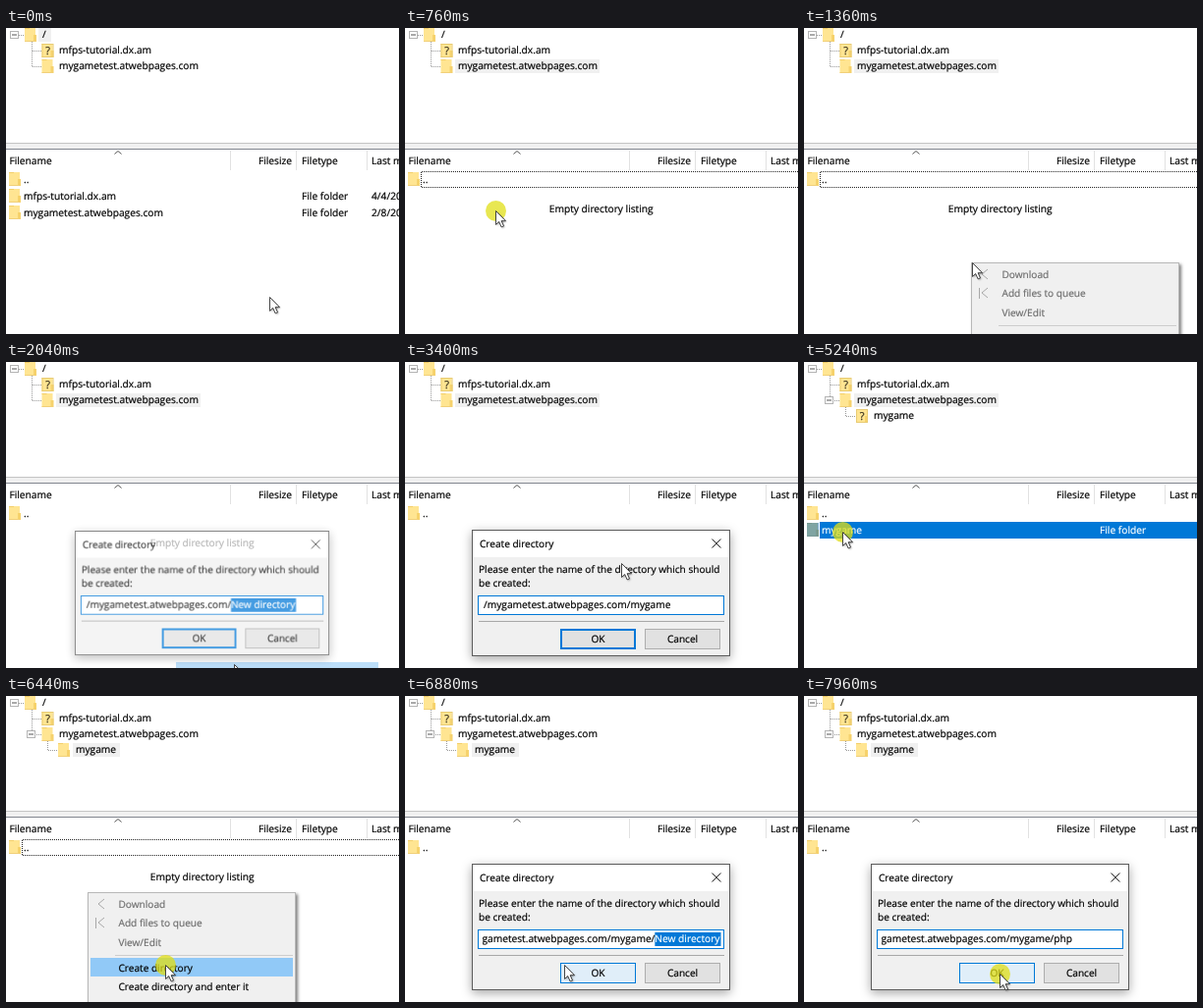
Write an HTML page with a canvas that moves like this. It is 400x312 px and loops after 8 s.

```html
<!DOCTYPE html>
<html lang="en">
<head>
<meta charset="utf-8">
<title>Creating directories</title>
<style>
html, body { margin: 0; width: 100%; height: 100%; overflow: hidden; background: #fff; }
canvas { display: block; }
</style>
</head>
<body>
<canvas id="stage" width="400" height="312"></canvas>
<script>
const stage = document.getElementById('stage').getContext('2d');
// The dialog is drawn on its own layer, so that it fades as a whole
const layer = new OffscreenCanvas(400, 312).getContext('2d');
let ctx = stage;

const LOOP = 8000;
const FONT = '10.2px "Open Sans", "Noto Sans", sans-serif';
const LABEL_FONT = '10.1px "Open Sans", "Noto Sans", sans-serif';
const BLUE = '#0078d7', FACE = '#f0f0f0', INK = '#000';
const HOST = 'mygametest.atwebpages.com';

// Moments at which the state of the file browser changes
const SELECT_HOST = 480, ENTER_HOST = 720, CREATED = 4440, SELECT_CHILD = 5160, ENTER_CHILD = 5600;

// Pointer stops: time, x, y
const POINTER = [
  [0, 268, 274], [80, 268, 274], [460, 92, 186], [900, 92, 186], [1280, 171, 239], [1400, 171, 239],
  [1740, 232, 308], [2200, 232, 308], [2600, 228, 275], [2680, 228, 275], [3000, 220, 205],
  [3500, 220, 205], [3800, 200, 282], [4400, 200, 282], [5000, 39, 173], [5620, 39, 173],
  [5860, 83, 200], [5980, 83, 200], [6320, 162, 274], [6960, 162, 274], [7240, 121, 284], [7680, 199, 283]
];
const CLICKS = [480, 640, 1820, 3840, 5160, 5420, 6380, 7880];
const MENUS = [
  { x: 170, y: 239, from: 1330, to: 1920 },
  { x: 83, y: 200, from: 5900, to: 6540 }
];
const DIALOGS = [
  { path: `/${HOST}/`, word: 'mygame', keys: [2720, 2830, 2940, 3060, 3170, 3280], open: 1960, close: 3940 },
  { path: `/${HOST}/mygame/`, word: 'php', keys: [7360, 7580, 7820], open: 6600, close: 9000 }
];

const clamp = v => Math.max(0, Math.min(1, v));
const between = (t, a, b) => t >= a && t < b;

function pointerAt(t) {
  const i = POINTER.findIndex(p => p[0] > t);
  if (i < 0) return POINTER[POINTER.length - 1].slice(1);
  const [t0, x0, y0] = POINTER[i - 1], [t1, x1, y1] = POINTER[i];
  const u = (t - t0) / (t1 - t0), e = u * u * (3 - 2 * u);
  return [Math.round(x0 + (x1 - x0) * e), Math.round(y0 + (y1 - y0) * e)];
}

function box(x, y, w, h, fill) {
  ctx.fillStyle = fill;
  ctx.fillRect(x, y, w, h);
}

function frame(x, y, w, h, color, width = 1) {
  ctx.strokeStyle = color;
  ctx.lineWidth = width;
  ctx.strokeRect(x + width / 2, y + width / 2, w - width, h - width);
}

function line(points, color, dash = []) {
  ctx.strokeStyle = color;
  ctx.lineWidth = 1;
  ctx.setLineDash(dash);
  ctx.beginPath();
  points.forEach(([x, y]) => ctx.lineTo(x, y));
  ctx.stroke();
  ctx.setLineDash([]);
}

// A hairline outline gives the slightly heavy look of hinted screen text
function text(s, x, y, color = INK, align = 'left') {
  ctx.fillStyle = ctx.strokeStyle = color;
  ctx.lineWidth = 0.2;
  ctx.textAlign = align;
  ctx.fillText(s, x, y);
  ctx.strokeText(s, x, y);
}

function folder(x, y, unknown) {
  box(x, y, 11, 14, '#ffe592');
  box(x, y, 5, 1, '#f3cf6a');
  box(x + 9, y + 7, 3, 7, '#f6d26c');
  box(x, y + 13, 11, 1, '#f1d079');
  if (!unknown) return;
  frame(x, y, 12, 14, '#e8cb72');
  ctx.font = '11px "Open Sans", sans-serif';
  text('?', x + 6, y + 11, '#3a3420', 'center');
  ctx.font = FONT;
}

function expander(x, y) {
  box(x, y, 9, 8, '#fff');
  frame(x, y, 9, 8, '#b4b4b4');
  box(x + 2, y + 3.5, 5, 1, '#555');
}

function drawTree(t) {
  const dots = (...points) => line(points, '#999', [1, 1]);
  if (t < ENTER_HOST) box(33, 0, 13, 14, FACE);
  else if (t < ENTER_CHILD) box(51, 32, 147, 14, FACE);
  else box(68, 48, 48, 14, FACE);

  dots([13, 7.5], [20, 7.5]);
  dots([26.5, 14], [26.5, 39]);
  dots([27, 23.5], [36, 23.5]);
  dots([27, 39.5], [36, 39.5]);
  expander(4, 3);
  folder(19, 0);
  text('/', 37, 10);
  folder(36.5, 16, true);
  text('mfps-tutorial.dx.am', 54, 26);
  folder(36.5, 32);
  text(HOST, 54, 42);
  if (t >= CREATED) {
    dots([42.5, 46], [42.5, 55.5], [52, 55.5]);
    expander(21, 35);
    folder(53, 48, t < ENTER_CHILD);
    text('mygame', 71, 58);
  }
}

function drawRow(name, y, selected, date) {
  if (selected) box(16, y - 12, 384, 17, BLUE);
  const color = selected ? '#fff' : INK;
  folder(3, y - 11);
  if (selected) box(3, y - 11, 12, 14, 'rgba(0,100,180,.5)');
  text(name, 18, y, color);
  text('File folder', 301, y, color);
  if (date) text(date, 372, y, color);
}

function drawList(t) {
  box(0, 117, 400, 1, '#c4c4c4');
  box(0, 118, 400, 5, FACE);
  box(0, 123, 400, 1, '#828790');
  [228, 295, 367].forEach(x => box(x, 125, 1, 20, '#e2e2e2'));
  line([[110.5, 128.5], [114, 125.5], [117.5, 128.5]], '#555');
  text('Filename', 3.4, 139);
  text('Filesize', 291, 139, INK, 'right');
  text('Filetype', 301, 139);
  text('Last modified', 372, 139);

  folder(3, 147);
  text('..', 18, 158);
  const focused = between(t, ENTER_HOST, 1920) || between(t, 4000, SELECT_CHILD) || between(t, ENTER_CHILD, 6560);
  if (focused) line([[402, 146.5], [16.5, 146.5], [16.5, 162.5], [402, 162.5]], '#222', [1, 1]);

  if (t < ENTER_HOST) {
    drawRow('mfps-tutorial.dx.am', 175, false, '4/4/2020');
    drawRow(HOST, 192, t >= SELECT_HOST, '2/8/2020');
  } else if (between(t, CREATED, ENTER_CHILD)) {
    drawRow('mygame', 175, t >= SELECT_CHILD);
  } else {
    text('Empty directory listing', 199.7, 188, INK, 'center');
  }
}

function drawMenu(m, t, [px, py]) {
  const highlight = () => box(m.x + 3, m.y + 67, 206, 19, '#91c9f7');
  if (between(t, m.to, m.to + 180)) {
    ctx.globalAlpha = 1 - (t - m.to) / 300;
    highlight();
    ctx.globalAlpha = 1;
  }
  if (!between(t, m.from, m.to)) return;
  const gray = '#6d6d6d', icon = '#a8a8a8', { x, y } = m;
  ctx.save();
  ctx.shadowColor = 'rgba(0,0,0,.5)';
  ctx.shadowBlur = 3;
  ctx.shadowOffsetX = ctx.shadowOffsetY = 2;
  box(x, y, 212, 200, FACE);
  ctx.restore();
  frame(x, y, 212, 200, '#b8b8b8');
  if (py > y + 67) highlight();
  [12, 31].forEach(dy => line([[x + 17, y + dy - 5], [x + 11, y + dy], [x + 17, y + dy + 5]], icon));
  box(x + 8, y + 26, 1, 11, icon);
  ctx.font = LABEL_FONT;
  text('Download', x + 31.5, y + 16, gray);
  text('Add files to queue', x + 31.5, y + 35, gray);
  text('View/Edit', x + 31.5, y + 55, gray);
  box(x + 28, y + 64, 181, 1, '#cdcdcd');
  text('Create directory', x + 31.5, y + 81);
  text('Create directory and enter it', x + 31.5, y + 100);
}

function drawField(d, t) {
  const placeholder = 'New directory';
  const typed = d.keys.filter(k => k <= t).length;
  ctx.font = FONT;
  const pathWidth = ctx.measureText(d.path).width;
  const wordWidth = ctx.measureText(placeholder).width;
  // A long path is scrolled so that its end is visible
  const x = Math.min(80, 320.5 - pathWidth - wordWidth);
  box(74, 238, 251, 20, '#fff');
  frame(74, 238, 251, 20, BLUE);
  ctx.save();
  ctx.beginPath();
  ctx.rect(79, 239, 243, 18);
  ctx.clip();
  text(d.path, x, 251);
  if (!typed) box(x + pathWidth, 241, wordWidth + 1, 14, BLUE);
  text(typed ? d.word.slice(0, typed) : placeholder, x + pathWidth, 251, typed ? INK : '#fff');
  ctx.restore();
}

function drawDialogContent(d, t, [px, py]) {
  ctx.clearRect(0, 0, 400, 312);
  ctx.textRendering = 'geometricPrecision';
  ctx.save();
  ctx.shadowColor = 'rgba(0,0,0,.35)';
  ctx.shadowBlur = 10;
  ctx.shadowOffsetY = 3;
  box(68, 171, 263, 129, FACE);
  ctx.restore();
  box(69, 172, 261, 27, '#fff');
  frame(68, 171, 263, 129, '#5c5c5c');
  line([[312.5, 180.5], [321.5, 189.5]], '#222');
  line([[321.5, 180.5], [312.5, 189.5]], '#222');
  drawField(d, t);
  ctx.font = LABEL_FONT;
  text('Create directory', 76, 189);
  text('Please enter the name of the directory which should', 75, 215);
  text('be created:', 75, 229);
  box(75, 264, 250, 1, '#a8a8a8');

  const hover = px >= 158 && px < 235 && py >= 272 && py < 293;
  box(158, 272, 77, 21, hover ? '#e0eef9' : '#e1e1e1');
  frame(158, 272, 77, 21, BLUE, hover ? 1 : 2);
  text('OK', 196.5, 286, INK, 'center');
  box(244, 272, 77, 21, '#e1e1e1');
  frame(244, 272, 77, 21, '#adadad');
  text('Cancel', 282.5, 286, INK, 'center');
}

function drawDialog(d, t, pointer) {
  if (!between(t, d.open, d.close + 160)) return;
  ctx = layer;
  drawDialogContent(d, t, pointer);
  ctx = stage;
  const shown = t < d.close ? clamp((t - d.open) / 200) : 1 - (t - d.close) / 160;
  const scale = 0.93 + 0.07 * (1 - (1 - shown) ** 3);
  ctx.save();
  ctx.translate(199.5, 236);
  ctx.scale(scale, scale);
  ctx.globalAlpha = clamp(shown * 1.8);
  ctx.drawImage(layer.canvas, -199.5, -236);
  ctx.restore();
}

function drawPointer(t, [x, y]) {
  const click = CLICKS.find(c => between(t, c, c + 200));
  if (click !== undefined) {
    const fade = clamp((200 - (t - click)) / 80);
    ctx.fillStyle = `rgba(224,222,20,${0.75 * fade})`;
    ctx.beginPath();
    ctx.arc(x + 0.5, y + 0.5, 10.5, 0, Math.PI * 2);
    ctx.fill();
  }
  ctx.save();
  ctx.translate(x + 0.5, y + 0.5);
  const arrow = new Path2D('M0 0V14L3.2 11L5.6 16.4L8 15.4L5.6 10.2H10Z');
  ctx.shadowColor = 'rgba(0,0,0,.4)';
  ctx.shadowBlur = 2;
  ctx.shadowOffsetX = ctx.shadowOffsetY = 1;
  ctx.fillStyle = '#fff';
  ctx.fill(arrow);
  ctx.shadowColor = 'transparent';
  ctx.strokeStyle = '#333';
  ctx.lineWidth = 0.9;
  ctx.stroke(arrow);
  ctx.restore();
}

function render(now) {
  const t = now % LOOP, pointer = pointerAt(t);
  ctx.font = FONT;
  ctx.textRendering = 'geometricPrecision';
  box(0, 0, 400, 312, '#fff');
  drawTree(t);
  drawList(t);
  MENUS.forEach(m => drawMenu(m, t, pointer));
  DIALOGS.forEach(d => drawDialog(d, t, pointer));
  drawPointer(t, pointer);
}

const start = performance.now();
function tick() {
  render(performance.now() - start);
  requestAnimationFrame(tick);
}
tick();
</script>
</body>
</html>
```
